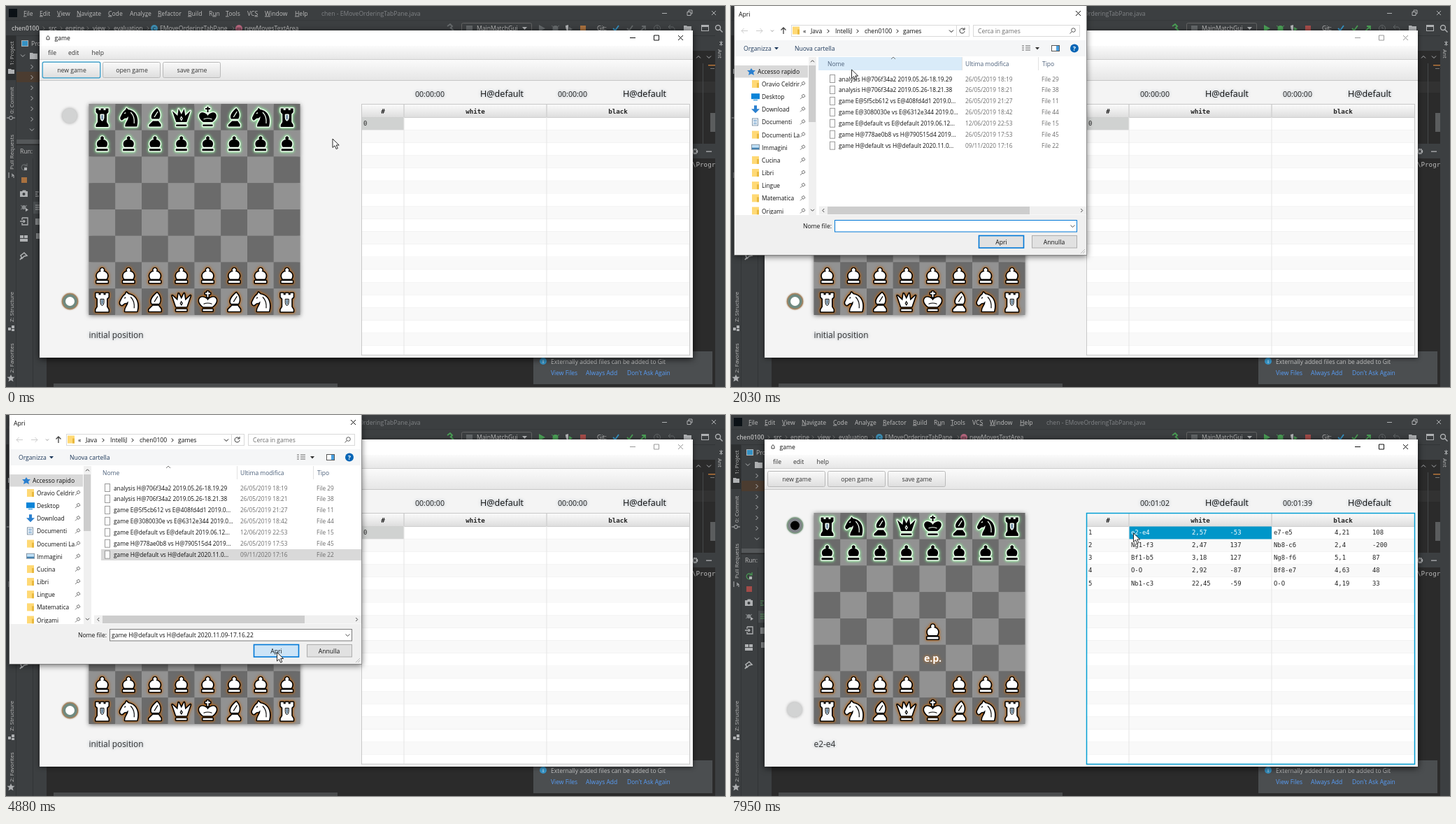
An HTML page that plays this animation: 1028 px wide and 545 px high, repeating every 8000 ms.

```html
<!DOCTYPE html>
<html lang="en">
<head>
<meta charset="utf-8">
<title>Opening a saved chess game</title>
<style>
html, body { margin: 0; width: 100%; height: 100%; overflow: hidden; background: #2b2b2b; }
svg { display: block; width: 100%; height: 100%; font-family: "Open Sans", "Noto Sans", sans-serif; }
text { white-space: pre; }
.mono { font-family: "DejaVu Sans Mono", monospace; }
.black { fill: #000; stroke: #f4fff4; stroke-width: 2.4; filter: drop-shadow(0 0 1.2px #d8ffd8) drop-shadow(0 0 2px #8f9); }
.white { fill: #fff; stroke: #000; stroke-width: 3.2; filter: drop-shadow(0 0 1.2px #c26a14) drop-shadow(0 0 2.2px #b0641c); }
.soft { filter: drop-shadow(0 0 2px #9aa8b4); }
#shadow { filter: drop-shadow(0 2px 5px #000b); }
#dialog, #tip { filter: drop-shadow(0 2px 4px #0008); }
</style>
</head>
<body>
<svg id="stage" viewBox="0 0 1028 545" preserveAspectRatio="none"></svg>
<script>
const stage = document.getElementById('stage');
const rect = (x, y, w, h, fill, more = '') => `<rect x="${x}" y="${y}" width="${w}" height="${h}" fill="${fill}" ${more}/>`;
const box = (x, y, w, h, fill, stroke, more = '') => rect(x + .5, y + .5, w - 1, h - 1, fill, `stroke="${stroke}" ${more}`);
const circle = (x, y, r, fill, more = '') => `<circle cx="${x}" cy="${y}" r="${r}" fill="${fill}" ${more}/>`;
const line = (d, color, width = 1, more = '') => `<path d="${d}" fill="none" stroke="${color}" stroke-width="${width}" ${more}/>`;
const shape = (d, fill) => `<path d="${d}" fill="${fill}"/>`;
// An underscore marks the mnemonic letter.
const text = (x, y, s, size = 8.6, fill = '#000', more = '') =>
  `<text x="${x}" y="${y}" font-size="${size}" fill="${fill}" ${more}>${s.replace(/_(.)/, '<tspan text-decoration="underline">$1</tspan>')}</text>`;
const group = (id, content, more = '') => `<g id="${id}" ${more}>${content}</g>`;
const chevron = (x, y, color, dx = 0, dy = 1, s = 3) => dy
  ? line(`M${x - s} ${y - dy * s / 2}l${s} ${dy * s}l${s} ${-dy * s}`, color)
  : line(`M${x - dx * s / 2} ${y - s}l${dx * s} ${s}l${-dx * s} ${s}`, color);
const range = n => [...Array(n).keys()];
const middle = 'text-anchor="middle"';

function ide() {
  const panel = '#3c3f41', ink = '#bbb', icon = '#afb1b3', dim = '#616567';
  const menu = [[25, '_File'], [48, '_Edit'], [73, '_View'], [101, '_Navigate'], [146, '_Code'], [177, 'Analy_ze'],
    [217, '_Refactor'], [260, '_Build'], [290, 'R_un'], [314, '_Tools'], [345, 'VC_S'], [370, '_Window'], [413, '_Help']];
  const crumbs = [[61, 'src'], [85, 'engine'], [124, 'view'], [154, 'evaluation'], [220, 'EMoveOrderingTabPane'], [341, 'newMovesTextArea']];
  const tabs = [[85, '1: Project'], [154, '0: Commit'], [234, 'Pull Requests'], [452, 'Z: Structure'], [525, '2: Favorites']];
  return rect(0, 0, 1028, 545, panel)
    + rect(4, 4, 12, 12, '#0b1116')
    + menu.map(([x, s]) => text(x, 13.5, s, 8.6, ink)).join('')
    + text(451, 13.5, 'chen - EMoveOrderingTabPane.java', 8.6, '#808386')
    + line('M938 10.500h7M974 8.500h5v5h-5zM976 8v-2h5v5h-2M1009 7l6 6m0-6l-6 6', icon)
    + rect(0, 20, 1028, 1, '#36393b') + rect(0, 42, 1028, 1, '#323537')
    + text(8, 35, 'chen0100', 8.5, ink, 'font-weight="600"')
    + crumbs.map(([x, s]) => text(x, 35, s, 8.6, ink)).join('')
    + [54, 79, 117, 147, 203, 325].map(x => chevron(x, 32, '#777', 1, 0, 2.5)).join('')
    + circle(212, 32, 5, '#3f8fb4') + text(212, 35, 'C', 7, '#222', middle)
    + circle(333, 32, 5, '#b3647c') + text(333, 35, 'm', 7, '#222', middle)
    + line('M631 29l4-3 3 3-3 3m1-1l5 6', 'var(--run)', 2)
    + box(651, 24, 101, 17, panel, '#646464', 'rx="2"') + rect(658, 28, 9, 7, dim)
    + text(673, 35, 'MainMatchGui', 8.6, ink) + shape('M738 30h7l-3.500 4z', icon)
    + shape('M762 27l9 5-9 5z', 'var(--run)')
    + circle(785.5, 32, 4, 'var(--run)') + line('M780 28l11 8m0-8l-11 8', 'var(--run)')
    + shape('M800 28l4-1v10q-4-2-4-9z', icon) + shape('M805 30l5 3-5 3z', 'var(--run)')
    + rect(821, 28, 8, 8, 'var(--stop)') + text(845, 35, 'Git:', 8.6, ink)
    + line('M868 32l3 3 5-7', '#3592c4', 1.8) + line('M888 32l3 3 5-7M907 36l7-7m-5 0h5v5', 'var(--run)', 1.8)
    + circle(931, 32, 4.5, 'none', `stroke="${dim}"`) + line('M931 29v3h2M948 30h5q3 0 3 5M950 27l-3 3 3 3', dim)
    + shape('M969 28h4l1 1h6v7h-11z', icon) + box(994, 27, 11, 9, 'none', icon) + rect(994, 27, 11, 3, icon)
    + circle(1018, 31, 3.5, 'none', `stroke="${icon}" stroke-width="1.400"`) + line('M1020.500 33.500l4 4', icon, 1.5)
    // left stripe and project tree
    + rect(0, 42, 14, 64, '#2d2f30') + rect(14, 42, 1, 503, '#323537')
    + tabs.map(([y, s]) => text(0, 0, s, 8, ink, `transform="translate(11 ${y}) rotate(-90)"`)).join('')
    + shape('M3 90h4l1 1h4v6h-9z', icon) + circle(7, 160, 2.5, 'none', `stroke="${icon}"`) + line('M1 160h3m6 0h3', icon)
    + line('M4 238v8m4-4h3v4m-3-6l3 2-3 2', icon) + rect(3, 460, 4, 4, icon) + rect(8, 457, 4, 4, icon) + rect(8, 462, 4, 3, icon)
    + shape('M7 527l1.500 3.500 4 .3-3 2.500 1 4-3.500-2-3.500 2 1-4-3-2.500 4-.3z', icon)
    + rect(15, 94, 33, 15, '#4b3c30')
    + box(22, 49, 10, 9, '#3592c4', icon) + text(36, 57, 'Project', 8.6, ink)
    + chevron(24, 71, icon) + shape('M34 67h4l1 1h6v8h-11z', icon)
    + [87, 102, 117, 132, 147, 162].map(y => chevron(37, y, icon, 1, 0)).join('') + chevron(37, 177, icon)
    + rect(15, 191, 33, 6, '#55585a') + rect(14, 198, 34, 1, '#2b2b2b') + text(20, 211, 'Run:', 8.6, ink)
    + line('M29 228a4 4 0 1 0 1 4M30 225v4h-4', 'var(--run)', 1.2) + rect(26, 231, 4, 4, icon) + rect(22, 245, 8, 8, 'var(--stop)')
    + shape('M20 265h3l1-1.500h4l1 1.500h2v8h-11z', icon) + circle(25.5, 269, 2, panel)
    + circle(25.5, 288, 3, '#85888a') + line('M21 285l9 6m0-6l-9 6', '#85888a') + shape('M28 289l4 2.500-4 2.500z', icon)
    + line('M23 303h8v10h-8v-3m0-4v-3M20 308h7m-2-2l2 2-2 2', icon, 1.3)
    + rect(20, 328, 5, 4, icon) + rect(26, 328, 5, 4, icon) + rect(20, 333, 11, 4, icon)
    + line('M26 353l4 4-4 1-3 3-2-4zM23 359l-3 4', icon, 1.6)
    + rect(39, 280, 10, 17, '#4c5052') + line('M42 285h6m-6 3h6m-6 3h6M42 266h5m-5 3h3m-3 3h5', 'var(--mark)')
    + rect(42, 304, 6, 9, '#85888a') + rect(43, 325, 5, 8, '#85888a') + rect(38, 218, 1, 327, '#323537')
    // editor and console edges
    + rect(58, 503, 956, 42, '#2b2b2b') + rect(68, 540, 406, 5, '#4a4c4d')
    + rect(980, 64, 34, 133, '#2b2b2b') + rect(980, 108, 34, 16, '#323232') + chevron(990, 73, icon, 0, -1) + chevron(1005, 73, icon)
    + rect(996, 82, 1, 115, '#45484a') + rect(1004, 84, 10, 1.5, '#b8763a') + rect(1007, 89, 6, 1, '#777') + rect(1007, 153, 7, 27, '#5b5d5e')
    + circle(985, 208, 3, 'none', `stroke="${icon}" stroke-width="2.500" stroke-dasharray="1.800 .6"`) + rect(1001, 207.5, 8, 1.3, icon)
    + rect(980, 218, 34, 327, '#2b2b2b') + text(981, 230, '\\Progr', 9.2, ink, 'class="mono"')
    + rect(1014, 42, 14, 503, panel) + line('M1020 51l5 5m0-5l-5 5m2.500-6v7', icon)
    + text(0, 0, 'Ant', 8, ink, 'transform="translate(1018 62) rotate(90)"')
    + rect(754, 494, 256, 47, '#4b4e50') + circle(768, 508, 5, '#3592c4') + text(768, 511, 'i', 8, '#fff', middle)
    + text(779, 512, 'Externally added files can be added to Git', 8.5, '#c4c4c4')
    + [[779, 'View Files'], [829, 'Always Add'], [888, 'Don\'t Ask Again']].map(([x, s]) => text(x, 527.5, s, 8.5, '#589df6')).join('');
}

const pieces = {
  P: 'M17.500 13A2.400 2.400 0 1 1 20.500 13C27 14.500 28 20 25 24H13C10 20 11 14.500 17.500 13ZM11 26.500H27V29.500H11Z',
  R: 'M10 6.500H14V9H17V6.500H21V9H24V6.500H28V12L25.500 14.500V26L28 30V33H10V30L12.500 26V14.500L10 12Z',
  N: 'M14 32.500H31C34 22 31 10 18.500 8L16 5.500 14.500 8.500C11 10.500 9 15.500 7 19.500 6.500 23 9.500 25 11.500 22L14 20.500C16 21 17 20 18.500 18 19 24 14 26 14 32.500Z',
  B: 'M22 6C27 11 27.500 17 25 21.500H14.500C12 17 16 11 22 6ZM10.500 30L16 24.500H24L27.500 29.500V32.500H10.500Z',
  Q: 'M11.500 26L6 10 13.500 17 15 7 19 15 23 7 24.500 17 32 10 26.500 26ZM11.500 29.500H26.500V32H11.500Z',
  K: 'M12.500 26C3 19 6.500 11 13 12.500 16 13 18 15 19 17 20 15 22 13 25 12.500 31.500 11 35 19 25.500 26ZM18 4H20V6H22.500V8H20V12H18V8H15.500V6H18ZM12 29.500H26V32H12Z'
};
const details = {
  R: '<path d="M16.500 15H21.500V20Q21.500 23 19 24.500 16.500 23 16.500 20Z" fill="#cfdde6" stroke-width="1"/><path d="M19 16v6" stroke="#3b5f7c" stroke-width="1.400"/>',
  N: '<path d="M13 14l2-1.500M22 12Q28 18 27 28" fill="none" stroke-width="1.200"/>',
  B: '<path d="M23 11L18 19" fill="none" stroke-width="1.400"/>',
  Q: '<path d="M19 18.500l1.500 2.500-1.500 2.500-1.500-2.500z" fill="none" stroke-width="1.200"/>',
  K: '<path d="M13 22Q19 19.500 25 22" fill="none" stroke-width="1.200"/>'
};
const cell = 37.75;
const piece = (kind, col, row, id = '') =>
  `<g ${id && `id="${id}"`}><g transform="translate(${118.5 + col * cell} ${140 + row * cell})"><path d="${pieces[kind]}" stroke-linejoin="round" paint-order="stroke"/>${details[kind] || ''}</g></g>`;

function board() {
  const squares = range(64).map(i => {
    const col = i % 8, row = i >> 3;
    return rect(118.5 + col * cell, 140 + row * cell, cell, cell, (col + row) % 2 ? '#6b6b6b' : '#929292');
  }).join('');
  const army = (back, front) => [...'RNBQKBNR'].map((kind, i) =>
    piece(kind, i, back) + piece('P', i, front, front === 6 && i === 4 ? 'ePawn' : '')).join('');
  const off = y => circle(91, y, 10.5, '#d2d3d3', 'style="filter:drop-shadow(0 0 2px #999)"');
  const on = (y, dot, ring, glow) => `<g style="filter:drop-shadow(0 0 1px ${glow})">${circle(91.5, y, 11, ring, `stroke="${glow}" stroke-width="1.500"`)}${circle(91.5, y, 6.5, dot)}</g>`;
  return `<g style="filter:drop-shadow(0 1px 3px #777)">${squares}</g>`
    + `<g class="black">${army(0, 1)}</g><g class="white">${army(7, 6)}</g>`
    + group('whiteTurn', off(157) + on(422.5, '#fff', '#6f8a80', '#a5835f'))
    + group('blackTurn', on(158, '#000', '#81858a', '#7d9a82') + off(421.5)
      + text(288.5, 353, 'e.p.', 14, '#fff', `${middle} font-weight="bold" style="filter:drop-shadow(0 0 2px #e8811c)"`));
}

function table() {
  const moves = ['e2-e4 2,57 -53 e7-e5 4,21 108', 'Ng1-f3 2,47 137 Nb8-c6 2,4 -200', 'Bf1-b5 3,18 127 Ng8-f6 5,1 87',
    'O-O 2,92 -87 Bf8-e7 4,63 48', 'Nb1-c3 22,45 -59 O-O 4,19 33'];
  const columns = [572, 659, 713.5, 776, 863, 917], pitch = 18.15;
  const cells = (row, from = 0, to = 6, fill = '#222') => moves[row].split(' ').slice(from, to)
    .map((s, i) => text(columns[from + i], 171 + row * pitch, s, 8.9, fill)).join('');
  const clocks = (a, b) => `<g class="soft">${text(585, 130, a, 10.6, '#222')}${text(789, 130, b, 10.6, '#222')}</g>`;
  const grid = range(19).map(i => {
    const y = 159.5 + i * pitch, h = Math.min(pitch, 499 - y);
    return rect(509, y, 468, h, i % 2 ? '#f9f9f9' : '#fff') + rect(509, y + h - .5, 468, .8, '#ececec');
  }).join('');
  return `<g class="soft">${text(678, 130, 'H@default', 12.6, '#111')}${text(882, 130, 'H@default', 12.6, '#111')}</g>`
    + box(508, 140, 470, 360, '#fff', '#c8c8c8') + grid
    + rect(509, 141, 468, 18, 'url(#shade)') + rect(509, 159, 468, .8, '#c4c4c4')
    + group('rowMark', rect(509, 159.5, 60, 17.8, '#d0d2d1'))
    + [569, 773].map(x => rect(x - .5, 141, 1, 358, '#e5e5e5') + rect(x - .5, 141, 1, 18, '#c8c8c8')).join('')
    + `<g class="mono">`
    + [[539, '#'], [671, 'white'], [875, 'black']].map(([x, s]) => text(x, 153.5, s, 9.2, '#222', `${middle} font-weight="bold"`)).join('')
    + group('emptyRows', text(511, 171, '0', 8.9, '#222'))
    + group('gameRows', range(5).map(i => text(511, 171 + i * pitch, `${i + 1}`, 8.9, '#222') + cells(i)).join(''))
    + group('picked', rect(569.5, 159.5, 203.5, 18, '#0096c9') + cells(0, 0, 3, '#fff') + box(508, 140, 470, 360, 'none', '#039ed3', 'stroke-width="1.500"'))
    + '</g>' + group('zeroClocks', clocks('00:00:00', '00:00:00')) + group('gameClocks', clocks('00:01:02', '00:01:39'));
}

function gameWindow() {
  const buttons = ['new game', 'open game', 'save game'];
  const ring = (id, x) => group(id, box(x - .3, 79.700, 83.6, 23.6, 'none', '#2f9fd0', 'rx="2" stroke-width="1.200"'));
  const caption = s => text(118.5, 475, s, 11.9, '#333', 'class="soft"');
  return rect(48, 35, 934, 468, '#f4f4f4', 'id="shadow"') + rect(48, 35, 934, 22, '#fff')
    + line('M58 48v-3l2-2.500 2 2.500v3z', 'var(--caption)', .8) + text(69.5, 49, 'game', 8.6, 'var(--caption)')
    + line('M892 45.500h8M926.500 42h7v7h-7zM961 42l7 7m0-7l-7 7', 'var(--caption)')
    + rect(48, 57, 934, 19.5, 'url(#bar)') + rect(48, 76, 934, .8, '#c8c8c8') + rect(48, 77, 934, 29, 'url(#bar)') + rect(48, 106, 934, .8, '#bcbcbc')
    + text(60, 70, 'file', 8.6, '#333') + text(89, 70, 'edit', 8.6, '#333') + text(122.5, 70, 'help', 8.6, '#333')
    + buttons.map((s, i) => box(52 + i * 86, 80, 83, 23, 'url(#shade)', '#b9b9b9', 'rx="2"') + text(94 + i * 86, 95, s, 8.7, '#333', middle)).join('')
    + ring('ringNew', 52) + ring('ringOpen', 138)
    + group('captionStart', caption('initial position')) + group('captionMove', caption('e2-e4'))
    + board() + table();
}

function dialog() {
  const ink = '#111', gray = '#6d6d6d', header = '#4c607a';
  const files = [
    ['analysis H@706f34a2 2019.05.26-18.19.29', '26/05/2019 18:19', 29], ['analysis H@706f34a2 2019.05.26-18.21.38', '26/05/2019 18:21', 38],
    ['game E@5f5cb612 vs E@408fd4d1 2019.0...', '26/05/2019 21:27', 11], ['game E@3080030e vs E@6312e344 2019.0...', '26/05/2019 18:42', 44],
    ['game E@default vs E@default 2019.06.12...', '12/06/2019 22:53', 15], ['game H@778ae0b8 vs H@790515d4 2019...', '26/05/2019 17:53', 45],
    ['game H@default vs H@default 2020.11.0...', '09/11/2020 17:16', 22]];
  const places = ['Oravio Celdrin', 'Desktop', 'Download', 'Documenti', 'Documenti Lavoro', 'Immagini', 'Cucina', 'Libri', 'Lingue', 'Matematica', 'Origami'];
  const folder = (x, y) => rect(x, y, 10, 11, '#ffd975') + rect(x + 7, y + 4, 3, 7, '#e9b93f');
  const placeIcon = (s, y) => ({
    Desktop: rect(29, y + 1, 12, 8, '#0b84d8') + rect(32, y + 10, 6, 1, '#0b84d8'),
    Download: shape(`M33 ${y}h4v5h4l-6 6-6-6h4z`, '#2b80cf'),
    Documenti: box(30, y, 9, 11, '#fff', '#7c93a8') + line(`M32 ${y + 3}h5m-5 2.500h5m-5 2.500h5`, '#4c8ac0'),
    Immagini: box(29, y + 1, 12, 8, '#bfe0f7', '#8796a5') + rect(30, y + 6, 10, 2, '#3978a8')
  }[s] || folder(30, y));
  const shell = rect(5, 0, 503.5, 356, '#fff') + text(11, 14.5, 'Apri', 8.7, ink) + line('M493 7l7 7m0-7l-7 7', ink)
    + rect(5, 299, 503.5, 57, '#f0f0f0') + rect(111, 73, 11, 226, '#f0f0f0') + rect(111, 85, 10, 81, '#cdcdcd')
    + chevron(116.5, 79, '#444', 0, -1, 2.5) + chevron(116.5, 292, '#444', 0, 1, 2.5)
    + rect(126, 286.5, 382, 12, '#f0f0f0') + rect(138, 287, 289, 11, 'var(--thumb)')
    + rect(148, 306, 347, 17, '#fff') + rect(354, 328, 65, 18, '#e1e1e1');
  const sidebar = rect(5, 85, 105, 17.5, '#d9d9d9') + shape('M29 89l2 3 4 0-3 3 1 4-4-2-4 2 1-4-3-3h4z', '#2b80cf') + text(38, 97, 'Accesso rapido', 8.6, ink)
    + `<g clip-path="url(#side)">` + places.map((s, i) => {
      const y = 106 + i * 18.15;
      return placeIcon(s, y) + line(`M101 ${y + 4}l3-2 2 3-3 2zM102 ${y + 6}l-3 3`, '#777') + `<g clip-path="url(#label)">${text(44, y + 9, s, 8.4, ink)}</g>`;
    }).join('') + '</g>';
  const list = group('headHover', rect(125, 73, 205, 19, '#d9ebf9'))
    + line('M330.500 73v19M439.500 73v19', '#e2e2e2') + chevron(232, 74.5, '#777', 0, -1)
    + text(138, 85.5, 'Nome', 8.5, header) + text(335, 85.5, 'Ultima modifica', 8.5, header) + text(445, 85.5, 'Tipo', 8.5, header)
    + group('rowFill', rect(136, 96, 372, 16, 'var(--row)'))
    + group('rowEdge', box(136, 192, 372, 16, 'none', '#99d1ff'))
    + files.map(([name, date, type], i) => {
      const y = 107.5 + i * 15.95;
      return box(141, y - 9.5, 8, 12, '#fff', '#999') + text(154, y, name, 8.3, ink) + text(335, y, date, 8.3, gray) + text(444, y, `File ${type}`, 8.3, gray);
    }).join('');
  const nav = line('M24 35.500h-9m3.500-3.500l-3.500 3.500 3.500 3.500M36 35.500h9m-3.500-3.500l3.500 3.500-3.500 3.500', '#ccc') + chevron(59, 35.5, '#999', 0, 1, 2)
    + line('M75 40v-9m-3.500 3.500l3.500-3.500 3.500 3.500', '#444', 1.3)
    + box(86, 27, 255, 17, '#fff', '#d9d9d9') + folder(88, 29.5) + text(103, 39, '«', 9, ink)
    + [[114, 'Java'], [149, 'IntelliJ'], [191, 'chen0100'], [246, 'games']].map(([x, s]) => text(x, 39, s, 8.6, ink)).join('')
    + [139, 181, 238].map(x => chevron(x, 36, ink, 1, 0, 2.5)).join('') + chevron(315, 36, ink) + rect(322, 28, 1, 15, '#d9d9d9')
    + line('M333 33a3.500 3.500 0 1 0 1 3M334 31v3h-3', '#333')
    + box(346, 27, 153, 17, '#fff', '#d9d9d9') + text(353, 39, 'Cerca in games', 8.6, gray)
    + circle(489.5, 34.5, 2.8, 'none', 'stroke="#555"') + line('M487.500 36.500l-3 3', '#555')
    + rect(5, 49, 503, 23, '#f5f6f7') + text(18, 63.5, 'Organizza', 8.6, '#1e395b') + shape('M62 59h6l-3 3.500z', '#1e395b') + text(91, 63.5, 'Nuova cartella', 8.6, '#1e395b')
    + line('M416 57h3m-3 3h3m-3 3h3M421 57h7m-7 3h7m-7 3h7', '#666') + shape('M435 59h6l-3 3.500z', '#333')
    + box(458, 56, 12, 9, '#fff', '#555') + rect(465, 57, 4, 7, '#4aa0e0') + circle(491, 60.5, 6, '#0064b5') + text(491, 64, '?', 9, '#fff', `${middle} font-weight="bold"`);
  const footer = text(144, 317.5, 'Nome file:', 8.6, ink, 'text-anchor="end"') + box(148, 306, 347, 17.5, '#fff', 'var(--field)')
    + chevron(488.5, 315, '#555') + group('fileName', text(151, 317.8, 'game H@default vs H@default 2020.11.09-17.16.22', 8.5, ink))
    + group('caret', rect(151.5, 309, 1, 12, '#000'))
    + box(354, 328, 65, 18.5, 'var(--button)', '#0078d7', 'stroke-width="1.600"') + text(386.5, 340.5, 'Apri', 8.6, ink, middle)
    + box(430, 328, 65, 18.5, '#e1e1e1', '#adadad') + text(462, 340.5, 'Annulla', 8.6, ink, middle)
    + line('M500 354l6-6m-3 6l3-3', '#bbb') + chevron(132, 292.5, '#444', -1, 0, 2.5) + chevron(501.5, 292.5, '#444', 1, 0, 2.5);
  const tip = box(202, 167, 225, 49, '#fff', '#bbb') + text(207, 177, 'Nome: game E@3080030e vs E@6312e344 26.05.2019-18.42.44', 7.4, '#575757')
    + text(207, 188, 'Tipo: File 44', 8.4, '#575757') + text(207, 199, 'Dimensione: 1,02 KB', 8.4, '#575757') + text(207, 211, 'Ultima modifica - 26/05/2019 18:42', 8.4, '#575757');
  return shell + group('dialogBody', nav + sidebar + list + footer + group('tip', tip)) + line('M4.500 0v356.500h504V0', '#777', .7);
}

const gradient = (id, ...colors) => `<linearGradient id="${id}" x2="0" y2="1">${colors.map((c, i) => `<stop offset="${i}" stop-color="${c}"/>`).join('')}</linearGradient>`;
stage.innerHTML = '<defs>' + gradient('bar', '#fbfbfb', '#e6e6e6') + gradient('shade', '#fafafa', '#dedede')
  + `<clipPath id="side">${rect(5, 73, 105, 225.5, '#000')}</clipPath><clipPath id="label">${rect(5, 73, 93, 225, '#000')}</clipPath></defs>`
  + ide() + gameWindow() + group('dialog', dialog())
  + group('cursor', '<path d="M0 0V12.500L3 9.800 5.200 14.600 7.300 13.600 5.200 9H9.200Z" fill="#fff" stroke="#111" stroke-width=".9"/>');

const path = [[0, 467, 190], [630, 425, 165], [830, 340, 122], [1030, 262, 105], [1230, 205, 96], [1430, 176, 92], [1630, 172.5, 91],
  [2440, 205, 158], [3050, 207, 178], [3260, 208, 200], [3460, 208.5, 202], [3660, 225, 215], [3870, 265, 245], [4070, 320, 290],
  [4270, 362, 318], [4470, 383, 335], [4680, 387.5, 339.5], [6110, 391, 335], [6320, 440, 285], [6520, 515, 220], [6730, 560, 183],
  [6940, 574, 168.5], [7340, 575.5, 169]];
const el = id => document.getElementById(id);
const show = (id, on) => { el(id).style.opacity = +on; };
const paint = (name, value) => stage.style.setProperty('--' + name, value);

function render(t) {
  const within = (a, b) => t >= a && t < b;
  const [, x, y] = path.findLast(p => p[0] <= t);
  el('cursor').setAttribute('transform', `translate(${x} ${y})`);

  const busy = t < 1030, inactive = within(1630, 5300), loaded = t >= 5510, picked = t >= 7750, moved = t >= 7950;
  paint('run', busy ? '#65696b' : '#499c54');
  paint('mark', busy ? '#afb1b3' : '#5fa867');
  paint('stop', busy ? '#a9713f' : '#a34b48');
  paint('caption', inactive ? '#999' : '#111');
  el('shadow').style.filter = inactive ? 'drop-shadow(0 1px 3px #0009)' : '';

  show('ringNew', t < 1630);
  show('ringOpen', within(5300, 7750));
  for (const id of ['captionStart', 'emptyRows', 'zeroClocks']) show(id, !loaded);
  for (const id of ['captionMove', 'gameRows', 'gameClocks']) show(id, loaded);
  show('rowMark', !picked);
  el('rowMark').setAttribute('transform', `translate(0 ${loaded ? 72.6 : 0})`);
  show('picked', picked);
  show('whiteTurn', !moved);
  show('blackTurn', moved);
  el('ePawn').setAttribute('transform', `translate(0 ${moved ? -2 * cell : 0})`);

  const opening = within(1830, 2030), closing = within(5090, 5300), fading = opening || closing;
  show('dialog', 0);
  if (within(1830, 5300)) el('dialog').style.opacity = opening ? .5 : closing ? .35 : 1;
  el('dialog').setAttribute('transform', fading ? 'translate(5.100 4) scale(.978)' : '');
  show('dialogBody', !opening);
  const chosen = t >= 3460, clicked = t >= 4880;
  const row = chosen ? 6 : Math.floor((y - 96) / 16);
  show('headHover', within(2030, 2440));
  show('rowFill', t >= 2440);
  el('rowFill').setAttribute('transform', `translate(0 ${row * 16})`);
  paint('row', clicked ? '#d9d9d9' : chosen ? '#cce8ff' : '#e5f3ff');
  show('rowEdge', chosen && !clicked);
  show('fileName', chosen);
  show('caret', chosen && !clicked);
  paint('field', clicked ? '#7a7a7a' : '#0078d7');
  paint('button', clicked ? '#cce4f7' : t >= 4470 ? '#e5f1fb' : '#e1e1e1');
  paint('thumb', opening ? '#aaa' : within(4070, 4270) ? '#a6a6a6' : '#cdcdcd');
  el('tip').style.opacity = within(2650, 2850) ? .3 : +within(2850, 3050);
}

const start = performance.now();
function tick(now) {
  render(Math.max(0, now - start) % 8000);
  requestAnimationFrame(tick);
}
render(0);
requestAnimationFrame(tick);
</script>
</body>
</html>
```
